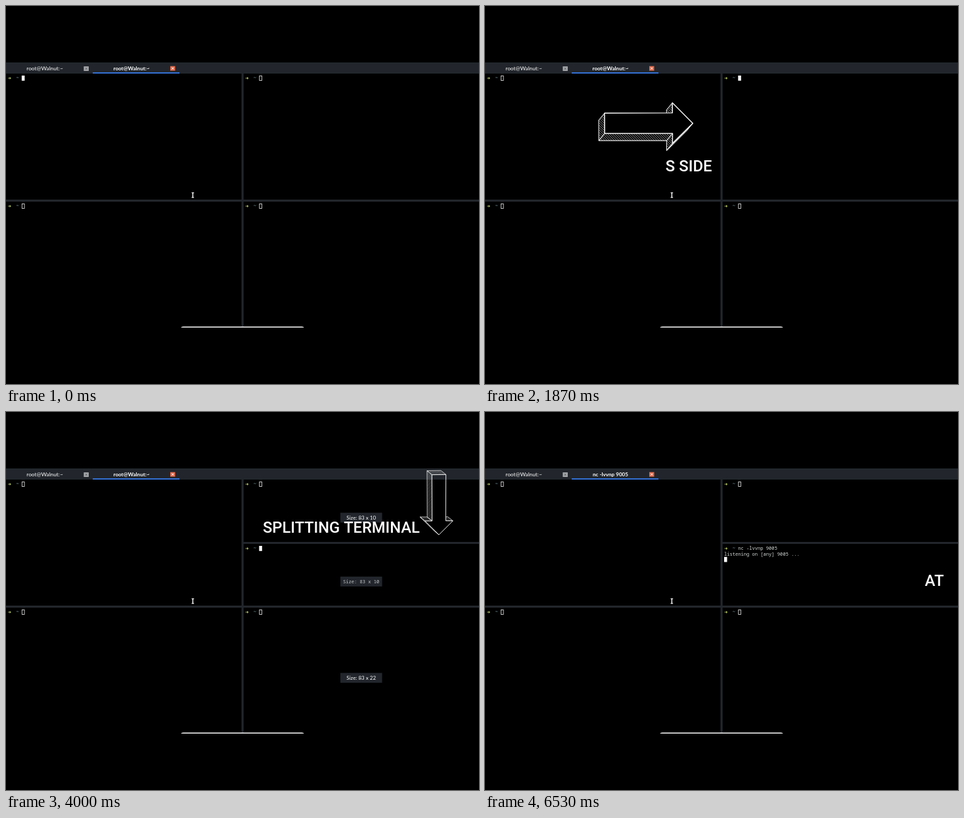
An HTML page with a canvas that plays this animation: 720x576 px, repeating every 6.59 s.

```html
<!DOCTYPE html>
<html lang="en">
<head>
<meta charset="utf-8">
<title>Split terminal</title>
<style>
  html, body { margin: 0; width: 100%; height: 100%; overflow: hidden; background: #000; }
  canvas { display: block; }
</style>
</head>
<body>
<canvas id="stage" width="720" height="576"></canvas>
<script>
const c = document.getElementById('stage').getContext('2d');
const LOOP = 6590, TYPE_MS = 480, CELL = 4.26;
const BAR = '#22262c', WHITE = '#fff', GREY = '#d4d6d6', GREEN = '#b0bf62';
const MONO = '7.1px "Noto Sans Mono", monospace';
const LABEL = '8px Lato, sans-serif';
const TAB = '8.3px Lato, sans-serif', TAB_BOLD = 'bold 8.1px Lato, sans-serif';
const COMMAND = 'nc -lvvnp 9005', HOST = 'root@Walnut:~';
const FOCUS = 900, SPLIT = 3130, ENTER = 6330;

const captions = [
  { text: 'MOVING TO THIS SIDE', x: 101.4, y: 252, size: 23.9, start: 40, leave: 1540 },
  { text: 'SPLITTING TERMINAL', x: 391, y: 183.5, size: 23.7, start: 3010, leave: 3994 },
  { text: 'STARTING SOLGAT', x: 492.6, y: 264.6, size: 23.8, start: 5210, leave: 6097 },
];

// The same arrow twice, placed by its tip
const arrows = [
  { x: 316.5, y: 178.5, turn: 0, scale: 1, start: 40, end: 2100 },
  { x: 659, y: 187, turn: Math.PI / 2, scale: 0.68, start: 3010, end: 4440 },
];
const LENGTH = 134.5, SHAFT = 15.5, HEAD = 31, DEPTH = [-9, 11];
const lowerHalf = [[-LENGTH, SHAFT], [-HEAD, SHAFT], [-HEAD, HEAD]];
const upperHalf = lowerHalf.map(([x, y]) => [x, -y]).reverse();
const arrowFace = [...lowerHalf, [0, 0], ...upperHalf];

const clamp = v => Math.max(0, Math.min(1, v));

function rect(color, x, y, w, h) {
  c.fillStyle = color;
  c.fillRect(x, y, w, h);
}

function text(str, x, y, font, color = WHITE, align = 'left') {
  c.font = font;
  c.fillStyle = color;
  c.textAlign = align;
  c.fillText(str, x, y);
}

function line(color, width, x1, y1, x2, y2) {
  c.strokeStyle = color;
  c.lineWidth = width;
  c.beginPath();
  c.moveTo(x1, y1);
  c.lineTo(x2, y2);
  c.stroke();
}

function polygon(path, points) {
  points.forEach(([x, y], i) => i ? path.lineTo(x, y) : path.moveTo(x, y));
  path.closePath();
  return path;
}

function closeButton(x, y, color, cross) {
  rect(color, x, y, 7.5, 7);
  line(cross, 1, x + 2.2, y + 2, x + 5.3, y + 5);
  line(cross, 1, x + 5.3, y + 2, x + 2.2, y + 5);
}

function cursor(x, y, active) {
  if (active) return rect(WHITE, x, y, 4.5, 7.8);
  c.strokeStyle = '#d8d8d8';
  c.lineWidth = 0.9;
  c.strokeRect(x + 0.5, y + 0.5, 3.6, 7);
}

function pane(x, y, active, typed = '', running = false) {
  line(GREEN, 0.9, x + 0.6, y + 4, x + 4, y + 4);
  c.fillStyle = GREEN;
  c.fill(polygon(new Path2D(), [[x + 3, y + 2.1], [x + 5.3, y + 4], [x + 3, y + 5.9]]));
  text('~', x + 3 * CELL, y + 6.2, MONO, '#8fb4bb');
  text(typed, x + 5 * CELL, y + 6.2, MONO, GREY);
  if (!running) cursor(x + (5 + typed.length) * CELL, y, active);
}

function sizeLabel(y, rows, font, color) {
  rect(BAR, 509, y, 63.5, 15);
  text('Size: 83 x ' + rows, 540.7, y + 10.3, font, color, 'center');
}

function chrome(t) {
  rect(BAR, 0, 86, 720, 17);
  text(HOST, 59, 98, TAB, WHITE, 'center');
  text(t < ENTER ? HOST : COMMAND, 191, 97.7, TAB_BOLD, WHITE, 'center');
  closeButton(118.4, 92, '#a5a7aa', '#55585d');
  closeButton(250, 91.6, '#e2694b', WHITE);
  rect('#3470d4', 132, 101, 132, 2);
  rect(BAR, 358.5, 103, 3.2, 386);
  rect(BAR, 0, 295, 720, 3.2);
  c.fillStyle = WHITE;
  c.beginPath();
  c.roundRect(265, 488.4, 190, 10, 5);
  c.save();
  c.clip();
  c.fillRect(265, 488, 190, 2);
  c.restore();
}

function panes(t) {
  const split = t >= SPLIT, moved = t >= FOCUS;
  pane(2.6, 106, !moved);
  pane(2.6, 301, false);
  pane(364, 301, false);
  pane(364, 106, moved && !split);
  if (!split) return;

  rect(BAR, 361, 198, 359, 3);
  const typed = t < 4670 ? 0 : t < 4730 ? 1 : t < 5070 ? 2 : COMMAND.length;
  pane(364, 204, true, COMMAND.slice(0, typed), t >= ENTER);
  if (t >= ENTER) {
    text('listening on [any] 9005 ...', 364, 218.5, MONO, GREY);
    cursor(364, 220.8, true);
  }
  if (t < SPLIT + 1000) {
    sizeLabel(153.5, 10, LABEL, WHITE);
    sizeLabel(250.8, 10, MONO, '#c4c6c8');
    sizeLabel(397.6, 22, LABEL, WHITE);
  }
}

function pointer() {
  line(WHITE, 1.4, 284.4, 284.5, 284.4, 292);
  for (const y of [284.6, 291.8]) line(WHITE, 1.1, 282.6, y, 286.2, y);
}

function drawArrow({ x, y, turn, scale, start, end }, t) {
  if (t < start || t >= end) return;
  const step = Math.floor(t / 135);
  const face = arrowFace.map(([px, py], i) =>
    [px + Math.sin(i * 7 + step * 5) * 0.25, py + Math.cos(i * 4 + step * 3) * 0.25]);
  const back = face.map(([px, py]) => [px + DEPTH[0], py + DEPTH[1]]);
  const front = polygon(new Path2D(), face);

  // Only edges that look towards the depth show a side
  const sides = new Path2D();
  face.forEach((p, i) => {
    const j = (i + 1) % face.length, q = face[j];
    const facing = (q[0] - p[0]) * DEPTH[1] - (q[1] - p[1]) * DEPTH[0];
    if (facing > 0) polygon(sides, [p, q, back[j], back[i]]);
  });

  c.save();
  c.translate(x, y);
  c.rotate(turn);
  c.scale(scale, scale);
  c.lineJoin = 'round';
  const reveal = clamp((t - start) / TYPE_MS);
  c.beginPath();
  c.rect(-150, -40, 155 * reveal, 90);
  c.clip();

  c.save();
  const outside = new Path2D(front);
  outside.rect(-200, -100, 400, 200);
  c.clip(outside, 'evenodd');
  c.strokeStyle = '#eee';
  c.lineWidth = 1.1;
  c.stroke(sides);
  c.clip(sides);
  for (let d = -240; d < 40; d += 3.6) line('#c4c4c4', 0.75, d, -40, d + 90, 50);
  c.restore();

  c.strokeStyle = WHITE;
  c.lineWidth = 1.3;
  c.stroke(front);
  c.restore();
}

// Letters appear from the left, then vanish from the left
function caption({ text: str, x, y, size, start, leave }, t) {
  const n = str.length, font = `500 ${size}px Roboto, sans-serif`;
  const shown = Math.ceil(clamp((t - start) / TYPE_MS) * n);
  const gone = Math.floor(clamp((t - leave) / TYPE_MS) * n);
  c.font = font;
  const offset = c.measureText(str.slice(0, gone)).width;
  text(str.slice(gone, shown), x + offset, y, font);
}

let origin;
function frame(now) {
  origin ??= now;
  const t = (now - origin) % LOOP;
  rect('#000', 0, 0, 720, 576);
  chrome(t);
  panes(t);
  pointer();
  for (const a of arrows) drawArrow(a, t);
  for (const item of captions) caption(item, t);
  requestAnimationFrame(frame);
}
requestAnimationFrame(frame);
</script>
</body>
</html>
```
